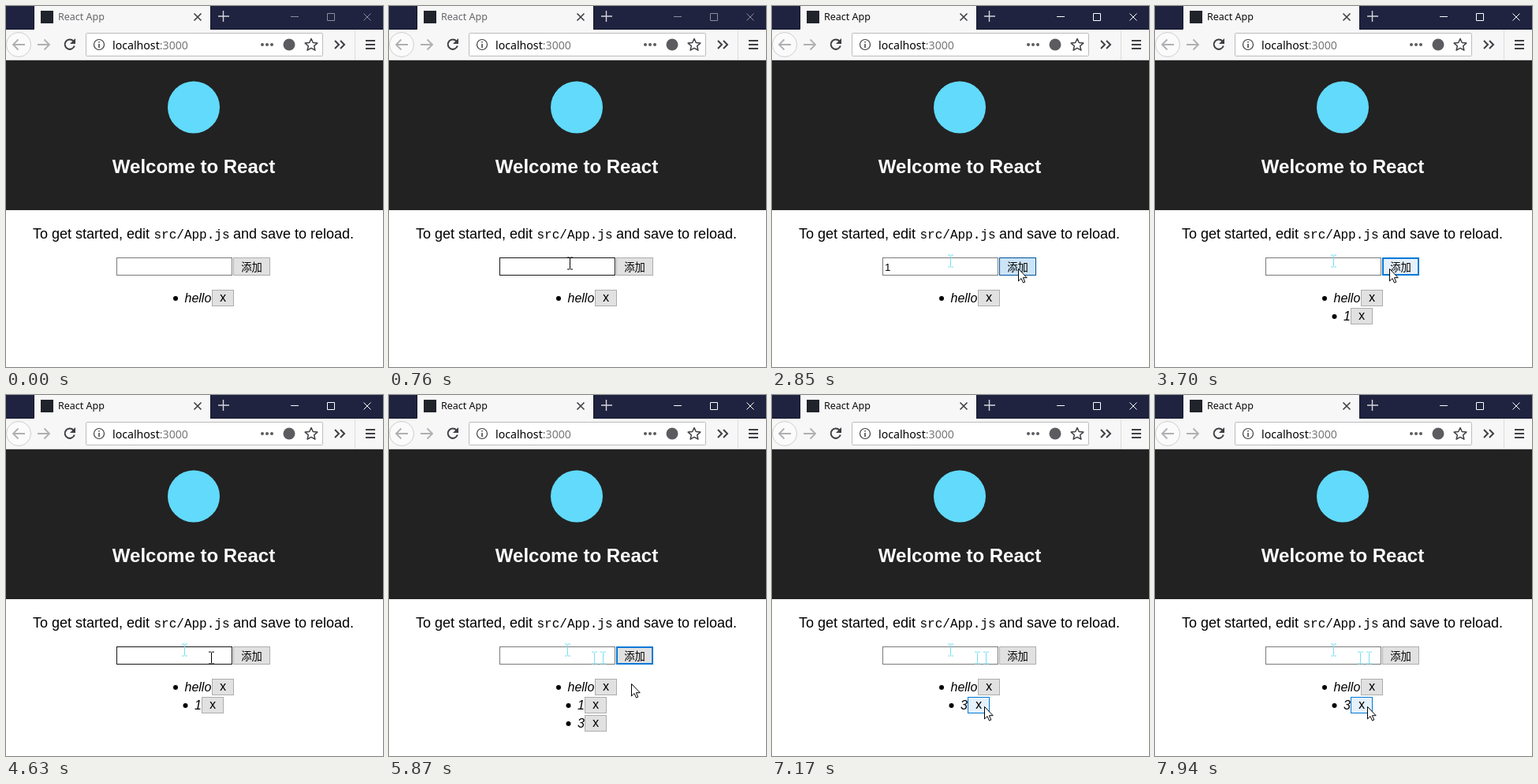
Recreate the animation shown at these times as an HTML page. Size 478 px wide and 458 px high, loop 8000 ms.

```html
<!DOCTYPE html>
<html lang="en">
<head>
<meta charset="utf-8">
<title>React App</title>
<style>
html, body { margin: 0; width: 100%; height: 100%; overflow: hidden; background: #fff; }
svg { display: block; width: 478px; height: 458px; }
text { font-family: "Liberation Sans", Arial, sans-serif; white-space: pre; }
.ui { font-family: "Noto Sans", "Open Sans", sans-serif; }
.cjk { font: 13.33px "Noto Sans CJK SC", "Noto Sans CJK", sans-serif; }
.mono { font-family: "Liberation Mono", monospace; font-size: 16px; }
.line { fill: none; stroke: #3f3f44; }
.crisp { shape-rendering: crispEdges; }
</style>
</head>
<body>
<svg viewBox="0 0 478 458">
  <defs>
    <path id="beam" d="M-3.5-7.5h3M.5-7.5h3M0-7V7M-3.5 7.5h3M.5 7.5h3" fill="none"/>
  </defs>

  <!-- browser window -->
  <path fill="#20233f" d="M0 0h478v30H0z"/>
  <path fill="#f7f7f8" d="M35 0h224v30h219v39H0V30h35z"/>
  <path fill="none" stroke="#14162b" d="M0 29.5h35.5V0M259.5 0v29.5H478"/>
  <path stroke="#cfcfd1" d="M0 68.5h478"/>
  <path fill="#20232a" d="M44 6h16v16H44z"/>
  <text id="tab" class="ui" x="66" y="18" font-size="12.5">React App</text>
  <path class="line" stroke-width="1.6" d="M238.5 9.5l9 9m0-9l-9 9"/>
  <path class="line" style="stroke:#d5d6dc" stroke-width="1.4" d="M269 13h14M275.5 6v14"/>
  <path id="controls" fill="none" d="M361 13.5h10M407.5 9.5h9v9h-9zM453.5 9.5l9 9m0-9l-9 9"/>

  <circle cx="16" cy="49" r="15.5" fill="#fbfbfb" stroke="#cfcfcf"/>
  <g class="line" style="stroke:#b0b0b2" stroke-width="1.8">
    <path d="M24 49H9m6.5-6.5L9 49l6.5 6.5"/>
    <path d="M40 49h15m-6.5-6.5L55 49l-6.5 6.5"/>
  </g>
  <path class="line" stroke-width="2" d="M85.5 44.500a6.200 6.200 0 1 0 1.300 6"/>
  <path fill="#3f3f44" d="M88 41v7h-7z"/>
  <rect x="101.5" y="34.5" width="300" height="29" rx="1" fill="#fff" stroke="#bcbcbe"/>
  <circle class="line" cx="118" cy="49" r="6.5" stroke-width="1.2"/>
  <path class="line" stroke-width="1.5" d="M118 45v1.600M118 48v5"/>
  <text class="ui" x="135" y="54.5" font-size="14.15">localhost<tspan fill="#77777a">:3000</tspan></text>
  <g fill="#5c5c60">
    <circle cx="325" cy="49" r="2"/><circle cx="331" cy="49" r="2"/><circle cx="337" cy="49" r="2"/>
    <circle cx="359" cy="49" r="7.5"/>
  </g>
  <path class="line" stroke-width="1.5" stroke-linejoin="round" d="M387 41.5l2.300 5 5.500.6-4.100 3.700 1.200 5.400-4.900-2.800-4.900 2.800 1.200-5.400-4.100-3.700 5.500-.6z"/>
  <path class="line" stroke-width="2" d="M417 44l5 5-5 5m7-10l5 5-5 5"/>
  <path stroke="#dcdcde" d="M442.5 30v38"/>
  <path class="line" stroke-width="2" d="M456 44h12m-12 5h12m-12 5h12"/>

  <!-- page -->
  <path fill="#222" d="M0 69h478v190H0z"/>
  <circle cx="238" cy="128.5" r="33" fill="#61dafb"/>
  <text x="238" y="212" font-size="24" font-weight="bold" fill="#fff" text-anchor="middle">Welcome to React</text>
  <g font-size="18">
    <text x="34" y="295">To get started, edit </text>
    <text class="mono" x="187.5" y="295">src/App.js</text>
    <text x="288" y="295">and save to reload.</text>
  </g>

  <rect id="field" class="crisp" x="140.5" y="319.5" width="146" height="22" fill="#fff"/>
  <text id="value" x="143" y="336" font-size="13.33"></text>
  <path id="caret" class="crisp" stroke="#000" d="M0 323v15"/>
  <rect id="add" class="crisp" x="288.5" y="319.5" width="46" height="22"/>
  <path id="ring" class="crisp" fill="none" stroke="#0078d7" stroke-width="2" d="M289 320h45v21h-45z"/>
  <text class="cjk" x="311.5" y="336" text-anchor="middle">添加</text>

  <g id="list"></g>
  <g id="trails" stroke="#74dff0"></g>
  <use id="ibeam" href="#beam" stroke="#000"/>
  <path id="arrow" fill="#fff" stroke="#000" d="M-.5.5v15.500l3.500-3.400 2.500 5.500 2.300-1-2.400-5.400h4.800z"/>
</svg>
<script>
const LOOP = 8000;
const $ = id => document.getElementById(id);
const set = (el, attrs) => { for (const k in attrs) el.setAttribute(k, attrs[k]); };
const show = (el, on) => set(el, { visibility: on ? 'visible' : 'hidden' });
const between = (t, spans) => spans.some(([a, b]) => t >= a && t < b);

// Pointer path: time, x, y
const path = [
  [150, 331, 424], [310, 314, 411], [620, 236, 331], [830, 226, 323],
  [1400, 226, 323], [1600, 248, 344], [1680, 248, 344], [1760, 285, 342],
  [1920, 338, 341], [2000, 349, 339], [2380, 349, 339], [2640, 313, 333],
  [3600, 313, 333], [3950, 260, 333], [4700, 260, 333], [4880, 271, 333],
  [5080, 308, 333], [5450, 308, 333], [5750, 308, 366], [6300, 308, 366],
  [6700, 270, 395], [8000, 270, 395]
];
const focusSpans = [[1000, 2690], [4050, 5200]];
const ringSpans = [[2690, 4050], [5200, 6900]];
const pressSpans = [[2690, 2930], [5200, 5380]];

// Faint marks left behind by the text cursor: time, x, y
const trails = [[1400, 226, 323], [4700, 260, 333], [4880, 271, 333]];
$('trails').innerHTML = trails.map(([, x, y]) =>
  `<use href="#beam" transform="translate(${x + .5} ${y + .5})"/>`).join('');

// Items: label, label x, button x, time added, time removed
const items = [
  ['hello', 226.5, 261, 0, LOOP],
  ['1', 239, 248, 2930, 7040],
  ['3', 239, 248, 5380, LOOP]
];
$('list').innerHTML = items.map(([label, x, bx]) =>
  `<g><circle cx="${x - 11.5}" cy="11" r="3"/>
    <text x="${x}" y="16" font-size="16" font-style="italic">${label}</text>
    <rect class="crisp" x="${bx + .5}" y=".5" width="27" height="20"/>
    <text class="ui" x="${bx + 14}" y="15" font-size="15.5" text-anchor="middle">x</text></g>`
).join('');
const rows = [...$('list').children];

function pointer(t) {
  if (t < path[0][0]) return [-50, -50];
  const i = path.findIndex(p => p[0] > t), [t0, x0, y0] = path[i - 1], [t1, x1, y1] = path[i];
  const k = (t - t0) / (t1 - t0);
  return [x0 + (x1 - x0) * k, y0 + (y1 - y0) * k].map(Math.round);
}

function paintButton(el, hover, pressed) {
  set(el, {
    fill: pressed ? '#cce4f7' : hover ? '#e5f1fb' : '#e1e1e1',
    stroke: pressed ? '#005499' : hover ? '#0078d7' : '#adadad'
  });
}

function draw(t) {
  const [x, y] = pointer(t);
  const inside = (l, top, r, b) => x >= l && x < r && y >= top && y < b;
  const overField = inside(140, 319, 287, 346);
  const active = t >= 1000;
  set($('tab'), { fill: active ? '#0c0c0d' : '#66666a' });
  set($('controls'), { stroke: active ? '#fff' : '#8b8d9e' });

  const focus = focusSpans.find(s => between(t, [s]));
  const text = between(t, [[2100, 2930]]) ? '1' : between(t, [[4780, 5380]]) ? '3' : '';
  set($('field'), { stroke: overField ? '#171717' : focus ? '#0078d7' : '#7a7a7a' });
  $('value').textContent = text;
  set($('caret'), { transform: `translate(${text ? 151.5 : 144.5} 0)` });
  show($('caret'), focus && (t - focus[0]) % 1000 < 500);

  const pressed = between(t, pressSpans);
  paintButton($('add'), inside(288, 319, 335, 342), pressed);
  show($('ring'), between(t, ringSpans) && !pressed);

  let top = 360;
  items.forEach(([label, , left, from, to], i) => {
    const on = t >= from && t < to;
    show(rows[i], on);
    if (!on) return;
    set(rows[i], { transform: `translate(0 ${top})` });
    paintButton(rows[i].querySelector('rect'),
      inside(left, top, left + 28, top + 21), label === '1' && t >= 6900);
    top += 23;
  });

  trails.forEach(([from], i) => show($('trails').children[i], t >= from));
  set($('ibeam'), { transform: `translate(${x + .5} ${y + .5})` });
  set($('arrow'), { transform: `translate(${x} ${y})` });
  show($('ibeam'), overField);
  show($('arrow'), !overField);
}

const start = performance.now();
function tick() {
  draw((performance.now() - start) % LOOP);
  requestAnimationFrame(tick);
}
tick();
</script>
</body>
</html>
```
